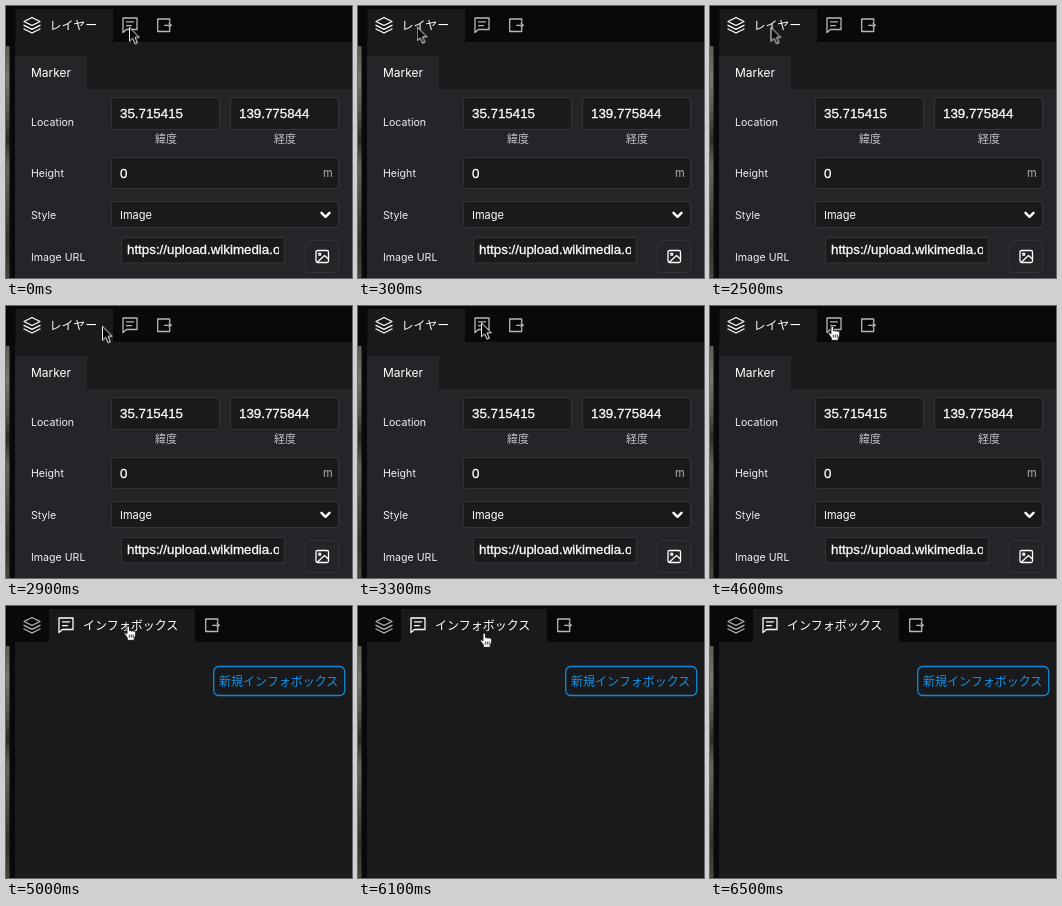
Write an HTML page that moves like this. It is 346 by 272 pixels and loops after 6.8 s.

```html
<!DOCTYPE html>
<html lang="ja">
<head>
<meta charset="utf-8">
<title>Layer panel</title>
<style>
html, body { margin: 0; width: 100%; height: 100%; overflow: hidden; background: #09090a; }
svg.stage { display: block; width: 346px; height: 272px; }
text { font: 10.6px Inter, sans-serif; fill: #f0f0f2; }
.jp { font: 12px "Noto Sans CJK JP", "Noto Sans CJK", sans-serif; fill: #fff; }
.unit { font-size: 11px; font-weight: 500; fill: #c4c4c8; }
.value { font: 13.33px "Liberation Sans", Arial, sans-serif; fill: #fff; stroke: #fff; stroke-width: .3; }
.field { fill: #1a1a1c; stroke: #343438; }
.icon { fill: none; stroke: #b8b8ba; stroke-width: 1.3; stroke-linejoin: round; stroke-linecap: round; }
.on { stroke: #fff; }

/* one 6.8 s clock; every change is a hard step */
.layers, .infobox, .cursor, .arrow, .hand {
  animation: 6.8s step-end infinite;
}
.layers { animation-name: layers; }
.infobox { animation-name: infobox; }
.cursor { animation-name: move; }
.arrow { animation-name: arrow; }
.hand { animation-name: hand; }

@keyframes layers { 0% { visibility: visible; } 73.529%, 100% { visibility: hidden; } }
@keyframes infobox { 0% { visibility: hidden; } 73.529%, 100% { visibility: visible; } }
@keyframes arrow {
  0% { visibility: visible; }
  63.235% { visibility: hidden; }
  91.176% { visibility: visible; }
  95.588%, 100% { visibility: hidden; }
}
@keyframes hand {
  0% { visibility: hidden; }
  63.235% { visibility: visible; }
  91.176%, 100% { visibility: hidden; }
}
@keyframes move {
  0% { transform: translate(123px, 20.5px); }
  2.941% { transform: translate(76px, 20px); }
  4.411% { transform: translate(58.5px, 20px); }
  36.764% { transform: translate(60.5px, 20.5px); }
  38.235% { transform: translate(64px, 22px); }
  39.705% { transform: translate(72px, 22.5px); }
  41.176% { transform: translate(83px, 21.5px); }
  42.647% { transform: translate(96px, 19.5px); }
  44.117% { transform: translate(109px, 17px); }
  45.588% { transform: translate(118px, 15px); }
  47.058% { transform: translate(121px, 15.5px); }
  48.529% { transform: translate(123px, 16px); }
  61.764% { transform: translate(123px, 16.5px); }
  63.235% { transform: translate(123px, 19px); }
  64.705% { transform: translate(123px, 20px); }
  67.647% { transform: translate(122px, 20px); }
  89.705% { transform: translate(126px, 27px); }
  91.176% { transform: translate(148px, 86px); }
  92.647% { transform: translate(184px, 176px); }
  94.117%, 100% { transform: translate(211px, 250px); }
}
</style>
</head>
<body>
<svg class="stage" viewBox="0 0 346 272">
  <defs>
    <linearGradient id="ground" x1="0" y1="0" x2="0" y2="1">
      <stop offset="0" stop-color="#5c5b52"/>
      <stop offset=".14" stop-color="#7a776c"/>
      <stop offset=".28" stop-color="#58584f"/>
      <stop offset=".4" stop-color="#2a2e28"/>
      <stop offset=".52" stop-color="#68665c"/>
      <stop offset=".68" stop-color="#4c4e45"/>
      <stop offset=".85" stop-color="#31352e"/>
      <stop offset="1" stop-color="#48483f"/>
    </linearGradient>
    <clipPath id="urlClip"><rect x="120" y="231" width="153" height="27"/></clipPath>
    <path id="stack" d="M0-7.5 8-3.5 0 .5-8-3.5ZM-8 .3 0 4.3 8 .3M-8 4 0 8 8 4"/>
    <path id="note" d="M-7-7H7V4.5H-3.5L-7 7.5ZM-3.5-3.2H3.5M-3.5.6H1.5"/>
    <path id="exit" d="M5.500-3.500V-6.500H-6.500V6H5.500V3M.500-.200H7M5-2.200 7-.200 5 1.800"/>
  </defs>

  <rect width="346" height="272" fill="#09090a"/>
  <rect y="40" width="3.5" height="232" fill="url(#ground)"/>
  <rect x="9" y="36" width="337" height="236" fill="#1a1a1d"/>

  <g class="layers">
    <rect x="9.5" y="3" width="97.5" height="33" fill="#1a1a1d"/>
    <use href="#stack" x="26" y="19" class="icon on"/>
    <text class="jp" x="43.5" y="24">レイヤー</text>
    <use href="#note" x="124" y="19" class="icon"/>
    <use href="#exit" x="158.2" y="19.5" class="icon"/>

    <path d="M9 50H81V83H346V272H9Z" fill="#252529"/>
    <text x="25" y="71" style="font-size:12px;fill:#fff">Marker</text>
    <text x="25" y="120">Location</text>
    <text x="25" y="171">Height</text>
    <text x="25" y="213">Style</text>
    <text x="25" y="254.500">Image URL</text>

    <g class="field">
      <rect x="105.5" y="91.5" width="108" height="32" rx="3"/>
      <rect x="224.5" y="91.5" width="108" height="32" rx="3"/>
      <rect x="105.5" y="151.5" width="227" height="31" rx="3"/>
      <rect x="105.5" y="195.5" width="227" height="26" rx="3"/>
      <rect x="115.5" y="231.5" width="163" height="25.5"/>
      <rect x="299.5" y="234.5" width="33" height="32" rx="4" fill="#252529"/>
    </g>
    <text class="value" x="114" y="112">35.715415</text>
    <text class="value" x="233" y="112">139.775844</text>
    <text class="jp unit" x="149" y="137">緯度</text>
    <text class="jp unit" x="268" y="137">経度</text>
    <text class="value" x="114" y="172">0</text>
    <text x="317" y="171" style="font-size:11px;fill:#b4b4b8">m</text>
    <text x="114" y="213" style="font-size:11px;fill:#fff">Image</text>
    <path class="icon on" d="M315.5 206.8 319.5 210.8 323.5 206.8" style="stroke-width:2.4"/>
    <text class="value" x="121" y="248" clip-path="url(#urlClip)">https://upload.wikimedia.org</text>
    <g class="icon on">
      <rect x="310" y="244.5" width="12.5" height="12" rx="1.5"/>
      <circle cx="313.7" cy="248.2" r="1.1"/>
      <path d="M311.5 256 318.5 249.5 322.5 253"/>
    </g>
  </g>

  <g class="infobox">
    <rect x="43" y="3" width="146" height="33" fill="#1a1a1d"/>
    <use href="#stack" x="26" y="19" class="icon"/>
    <use href="#note" x="60" y="19" class="icon on"/>
    <text class="jp" x="77" y="24">インフォボックス</text>
    <use href="#exit" x="206.2" y="19.5" class="icon"/>
    <rect x="207.75" y="60.5" width="131" height="29" rx="5" fill="none" stroke="#1488d8" stroke-width="1.3"/>
    <text class="jp" x="213" y="80" style="fill:#1592e6">新規インフォボックス</text>
  </g>

  <g class="cursor">
    <path class="arrow" d="M.5.8V14.800L3.700 11.900 6 17.200 8.400 16.200 6.100 10.900H10.300Z"
      fill="#0a0a0a" stroke="#f0f0f0" stroke-linejoin="round"/>
    <g class="hand" stroke="#111" stroke-width=".8" stroke-linejoin="round">
      <path fill="#fff" d="M.2.3C-.7.3-1 1-1 1.800V8L-2 7C-2.800 6.300-3.800 7-3.400 7.900L-.6 12V14.300H6.200V12.300C7.200 10.800 7.600 9.300 7.600 7.300V6C7.600 4.900 6.200 4.700 5.900 5.600 5.700 4.500 4 4.400 3.700 5.300 3.400 4.400 1.900 4.300 1.500 4.900V1.800C1.500.9 1.100.3.2.3Z"/>
      <path fill="none" d="M1.300 8.500V11.700M3.300 8.500V11.700M5.200 8.500V11.700"/>
    </g>
  </g>
</svg>
</body>
</html>
```
